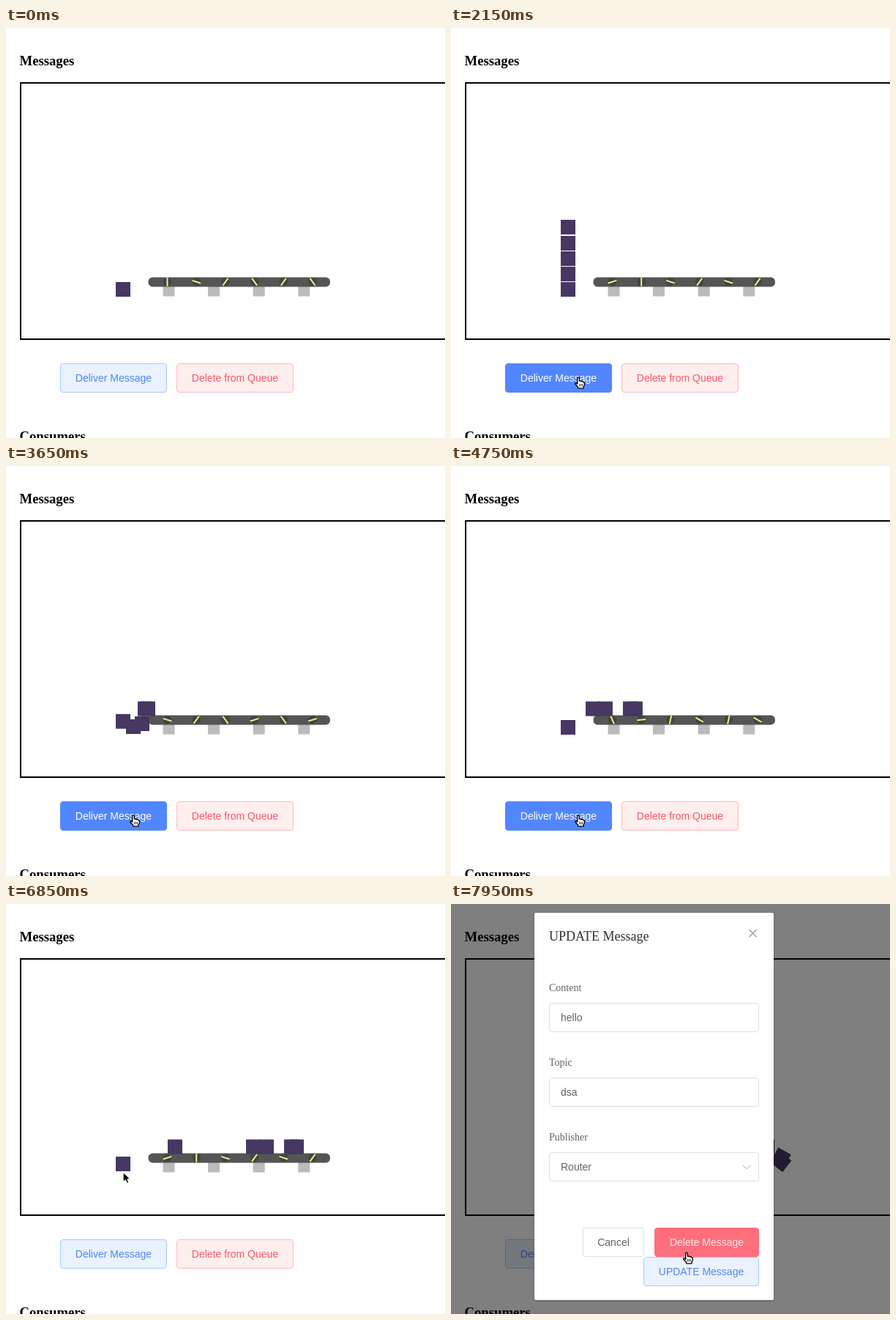
Animation of 600 by 560 pixels, one loop 8 s. Source, as an HTML page with a canvas:

```html
<!DOCTYPE html>
<html lang="en">
<head>
<meta charset="utf-8">
<title>Message queue</title>
<style>
  html, body { margin: 0; width: 100%; height: 100%; overflow: hidden; background: #fff; }
  #stage { position: relative; width: 600px; height: 560px; overflow: hidden; }
  #stage * { position: absolute; box-sizing: border-box; white-space: nowrap; }
  canvas { left: 0; top: 0; }
  h3, h4, label { margin: 0; line-height: 20px; font-family: "Liberation Serif", serif; }
  h3 { left: 18.5px; font-size: 18.72px; color: #000; }
  h4 { left: 20px; top: 22px; font-size: 18px; font-weight: 400; color: #303133; }
  label { left: 20px; font-size: 14px; color: #606266; }
  .frame { left: 19px; top: 74px; width: 700px; height: 352px; border: 2px solid #000; }
  .btn, .field {
    height: 40px; border: 1px solid #dcdfe6; border-radius: 4px; background: #fff; color: #606266;
    font: 14px/38px "Liberation Sans", sans-serif; text-align: center;
  }
  .primary { background: #e9f2fe; border-color: #a5c8ff; color: #5286f5; }
  .primary.hot { background: #5286ff; border-color: #5286ff; color: #fff; }
  .primary.down { background: #4a79e6; border-color: #4a79e6; }
  .danger { background: #ffeeee; border-color: #ffb8bd; color: #f95767; }
  .danger.hot { background: #ff6f7b; border-color: #ff6f7b; color: #ffe8e8; }
  .field { left: 20px; width: 287px; padding-left: 15px; text-align: left; }
  .field.hot { border-color: #c0c4cc; }
  #shade { left: 0; top: 0; width: 600px; height: 560px; background: #000; }
  #dialog {
    left: 114px; top: 12px; width: 327px; height: 529px; border-radius: 2px;
    background: #fff; box-shadow: 0 1px 3px rgba(0,0,0,.3);
  }
  svg { left: 0; top: 0; fill: none; }
</style>
</head>
<body>
<div id="stage">
  <h3 style="top:35px">Messages</h3>
  <div class="frame"></div>
  <div id="deliver" class="btn primary" style="left:74px;top:458px;width:146px">Deliver Message</div>
  <div class="btn danger" style="left:233px;top:458px;width:160px">Delete from Queue</div>
  <h3 style="top:548px">Consumers</h3>
  <canvas id="scene" width="600" height="560"></canvas>
  <div id="shade"></div>
  <div id="dialog">
    <h4>UPDATE Message</h4>
    <label style="top:93px">Content</label>
    <div class="field" style="top:123px">hello</div>
    <label style="top:195px">Topic</label>
    <div class="field" style="top:225px">dsa</div>
    <label style="top:297px">Publisher</label>
    <div id="select" class="field" style="top:327px">Router</div>
    <div class="btn" style="left:66px;top:430px;width:84px">Cancel</div>
    <div id="remove" class="btn danger" style="left:164px;top:430px;width:143px">Delete Message</div>
    <div class="btn primary" style="left:149px;top:470px;width:158px">UPDATE Message</div>
    <svg width="327" height="529">
      <path d="M293.5 23l10 10m0-10l-10 10" stroke="#909399" stroke-width="1.1"/>
      <path d="M285 345l5 5 5-5" stroke="#c0c4cc" stroke-width="1.1"/>
    </svg>
  </div>
  <canvas id="pointer" width="600" height="560"></canvas>
</div>
<script>
const LOOP = 8000, OPEN = 7335;
const FLOOR = 347, PITCH = 21, BELT_TOP = 321.6, BELT_END = 443;
const BELT_SPEED = 0.0691, HALF_G = 0.0005;
const $ = id => document.getElementById(id);
const scene = $('scene').getContext('2d');
const pointer = $('pointer').getContext('2d');

// spawn: arrival time, from: arrival height, push: sent to the belt, ride: moves with the belt
const boxes = [
  { spawn: -9999, from: 347, push: 2445, ride: 3912 },
  { spawn: 250, from: 305, push: 2800, ride: 4013 },
  { spawn: 820, from: 282, push: 3150, ride: 4505 },
  { spawn: 1400, from: 262, push: 3490, ride: 4766 },
  { spawn: 1971, from: 246, push: 4977, ride: 6315 },
  { spawn: 6567, from: 305, push: Infinity, ride: Infinity }
];
const rollers = [90, 18, 126, 54, 126, 54];

// Piecewise linear track of [time, x, y]
function along(keys, t) {
  let i = 1;
  while (i < keys.length - 1 && t > keys[i][0]) i++;
  const [a, b] = [keys[i - 1], keys[i]];
  const p = Math.min(1, Math.max(0, (t - a[0]) / (b[0] - a[0])));
  return [a[1] + (b[1] - a[1]) * p, a[2] + (b[2] - a[2]) * p];
}

// CSS "ease" timing curve
function ease(x) {
  if (x <= 0) return 0;
  if (x >= 1) return 1;
  const bez = (u, a, b) => 3 * u * (1 - u) * (1 - u) * a + 3 * u * u * (1 - u) * b + u * u * u;
  let lo = 0, hi = 1;
  for (let i = 0; i < 24; i++) {
    const mid = (lo + hi) / 2;
    if (bez(mid, 0.25, 0.25) < x) lo = mid; else hi = mid;
  }
  return bez(lo, 0.1, 1);
}

// Top-left corner and tilt of box i
function pose(i, t) {
  const b = boxes[i];
  if (t < b.push) {
    const gone = boxes.slice(0, i).filter(o => o.push <= t);
    const rest = FLOOR - PITCH * (i - gone.length);
    const last = gone.length ? gone[gone.length - 1].push : 0;
    const fresh = b.spawn > last;
    const y0 = fresh ? b.from : rest - PITCH;
    const dt = t - (fresh ? b.spawn : last);
    return [150, gone.length || fresh ? Math.min(rest, y0 + HALF_G * dt * dt) : rest, 0];
  }
  if (t < b.ride) {
    const climb = [
      [b.push, 150, FLOOR], [b.push + 160, 164, 346], [b.push + 500, 176, 342],
      [b.ride - 565, 178, 332], [b.ride - 363, 180, BELT_TOP],
      [b.ride - 262, 184, BELT_TOP], [b.ride, 184, BELT_TOP]
    ];
    return [...along(climb, t), 0];
  }
  const x = 184 + BELT_SPEED * (t - b.ride);
  const d = (x + 10 - BELT_END) / BELT_SPEED;
  if (d <= 0) return [x, BELT_TOP, 0];
  return [
    BELT_END - 10 + 8.4 * (1 - Math.exp(-d / 90)),
    BELT_TOP + 20.5 * Math.pow(d / 434, 1.31),
    d * 0.0875
  ];
}

function drawScene(t, turn) {
  const c = scene;
  c.clearRect(0, 0, 600, 560);
  c.fillStyle = '#bbb';
  for (const x of [214.5, 276, 337.7, 399.3]) c.fillRect(x, 353, 16, 13.5);
  c.fillStyle = '#555';
  c.beginPath();
  c.roundRect(194.5, 340.5, 248.5, 13, 6);
  c.fill();

  rollers.forEach((start, i) => {
    c.save();
    c.translate(220.5 + i * 39.7, 346.7);
    c.fillStyle = '#444';
    c.beginPath();
    c.arc(0, 0, 5.8, 0, 7);
    c.fill();
    c.rotate((start + turn) * Math.PI / 180);
    c.fillStyle = '#e5f584';
    c.fillRect(-6, -1, 12, 2);
    c.restore();
  });

  c.fillStyle = '#463763';
  boxes.forEach((b, i) => {
    if (t < b.spawn) return;
    const [x, y, tilt] = pose(i, t);
    c.save();
    c.translate(x + 10, y + 10);
    c.rotate(tilt * Math.PI / 180);
    c.fillRect(-10, -10, 20, 20);
    c.restore();
  });
}

const arrow = [[0, 0], [0, 14], [3.2, 11], [5.5, 15.5], [8, 14.5], [6, 10], [10.3, 10]];
const hand = [
  [-1.3, 1], [0, 0], [1.3, 1], [1.3, 5], [3, 4.8], [4, 5.8], [5.5, 5.6], [6.6, 6.6], [8.3, 7.2],
  [8.3, 10.5], [7, 13], [7, 15.2], [0, 15.2], [-0.8, 13], [-4, 9.5], [-4, 8], [-2.6, 8], [-1.3, 9.3]
];

const visits = [
  [[1450, 43, 223], [1700, 152, 441], [1750, 158, 450], [1850, 174, 477], [5700, 174, 477]],
  [[6350, 31, 443], [6550, 90, 415], [6800, 160, 366], [6950, 160, 366], [7050, 161, 357],
   [7780, 161, 357], [7900, 290, 452], [7950, 322, 476], [LOOP, 322, 476]]
];

function drawPointer(t) {
  const c = pointer;
  c.clearRect(0, 0, 600, 560);
  const path = visits.find(v => t >= v[0][0] && t < v[v.length - 1][0]);
  if (!path) return;
  const [x, y] = along(path, t);
  const pointing = (t >= 1800 && t < 6000) || t >= 7000;
  c.save();
  c.translate(x, y);
  c.beginPath();
  for (const p of pointing ? hand : arrow) c.lineTo(...p);
  c.closePath();
  c.lineJoin = 'round';
  c.fillStyle = pointing ? '#fff' : '#000';
  c.strokeStyle = pointing ? '#000' : '#fff';
  c.lineWidth = 1.3;
  c.fill();
  c.stroke();
  if (pointing) {
    c.lineWidth = 0.8;
    c.beginPath();
    for (const fx of [1.5, 3.5, 5.5]) {
      c.moveTo(fx, 9);
      c.lineTo(fx, 12.5);
    }
    c.stroke();
  }
  c.restore();
}

function drawPage(t) {
  const hot = t >= 1800 && t < 6000;
  const down = boxes.some(b => t >= b.push - 100 && t < b.push - 40);
  $('deliver').classList.toggle('hot', hot);
  $('deliver').classList.toggle('down', hot && down);
  $('select').classList.toggle('hot', t >= OPEN && t < 7850);
  $('remove').classList.toggle('hot', t >= 7900);
  const show = ease((t - OPEN) / 300);
  $('shade').style.opacity = 0.5 * ease((t - OPEN) / 200);
  $('dialog').style.opacity = show;
  $('dialog').style.transform = `translateY(${Math.round(-20 * (1 - show))}px)`;
}

// The picture moves 15 times a second, on a 50 ms grid; rollers turn 12 degrees per physics step
function render(now) {
  const n = Math.floor((Math.floor(now % LOOP / 50) + 0.5) * 0.75);
  const t = 50 * Math.round(n * 4 / 3);
  const steps = 4 * n - (n > 0) - (n > 20 && n < 40);
  drawScene(t, steps * 12);
  drawPage(t);
  drawPointer(t);
}

const begin = performance.now();
function tick() {
  render(performance.now() - begin);
  requestAnimationFrame(tick);
}
tick();
</script>
</body>
</html>
```
